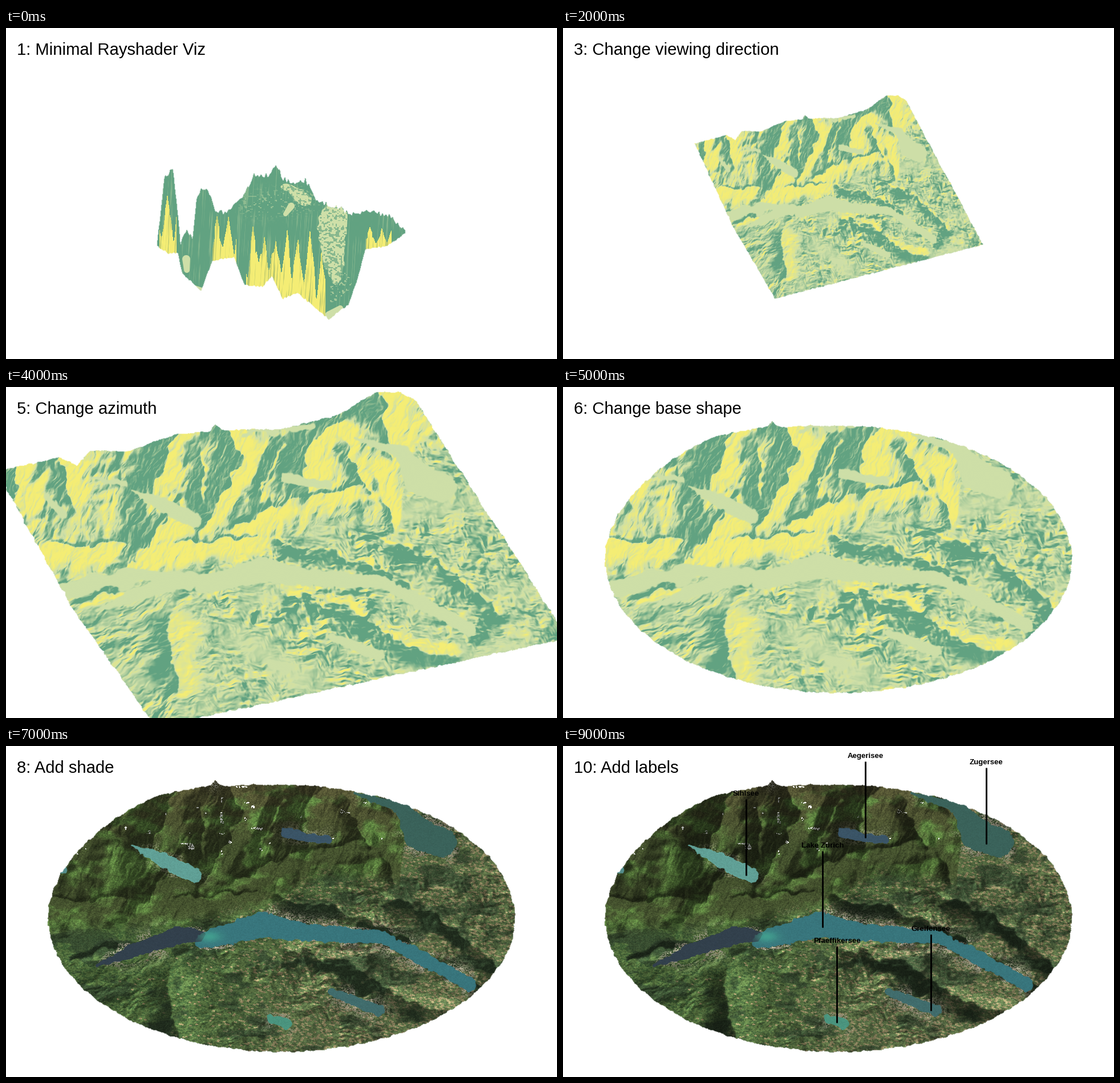
A matplotlib script for the animation above (10 s loop, 966x580 px).

```python
import numpy as np
import matplotlib.pyplot as plt
from matplotlib.animation import FuncAnimation
from matplotlib.path import Path
from matplotlib.transforms import Affine2D

W, H = 966, 580
X0, X1, Y0, Y1 = -40, 1010, -20, 610
X, Y = np.meshgrid(np.arange(X0, X1) + .5, np.arange(Y0, Y1) + .5)


def rgb(*c):
    return np.array(c) / 255


LIGHT, DARK, SUN = rgb(206, 223, 168), rgb(97, 162, 129), rgb(244, 237, 116)


# ---------- helpers ----------
def noise(u, v, seed):
    t = np.random.default_rng(seed).random((256, 256))
    iu, iv = np.floor(u).astype(int), np.floor(v).astype(int)
    fu, fv = u - iu, v - iv
    fu, fv = fu * fu * (3 - 2 * fu), fv * fv * (3 - 2 * fv)
    a, b, c, d = iu % 256, (iu + 1) % 256, iv % 256, (iv + 1) % 256
    top = t[a, c] * (1 - fu) + t[b, c] * fu
    low = t[a, d] * (1 - fu) + t[b, d] * fu
    return top * (1 - fv) + low * fv


def fbm(u, v, seed, octaves=4, ridged=False):
    total = 0
    for k in range(octaves):
        n = noise(u * 2 ** k, v * 2 ** k, seed + k)
        total = total + (1 - abs(2 * n - 1) if ridged else n) / 1.9 ** k
    return total


def cells(u, v, seed):
    t = np.random.default_rng(seed).random((256, 256))
    return t[np.floor(u).astype(int) % 256, np.floor(v).astype(int) % 256]


def blur(a, s):
    fy = np.fft.fftfreq(a.shape[0])[:, None]
    fx = np.fft.rfftfreq(a.shape[1])[None]
    g = np.exp(-2 * (np.pi * s) ** 2 * (fx ** 2 + fy ** 2))
    return np.fft.irfft2(np.fft.rfft2(a) * g, a.shape)


def mix(a, b, t):
    return a + (np.asarray(b) - a) * np.clip(t, 0, 1)[..., None]


def warp(amp, size, seed):
    dx = fbm(X / size, Y / size, seed, 3) - .9
    dy = fbm(X / size, Y / size, seed + 9, 3) - .9
    return X + amp * dx, Y + amp * dy


def spine(points, x, y):
    """Distance to a line with a radius at each point, and the side it lies on."""
    best, side = np.full(x.shape, 1e9), np.zeros(x.shape)
    for (xa, ya, ra), (xb, yb, rb) in zip(points, points[1:]):
        dx, dy = xb - xa, yb - ya
        t = np.clip(((x - xa) * dx + (y - ya) * dy) / (dx * dx + dy * dy), 0, 1)
        d = np.hypot(x - xa - t * dx, y - ya - t * dy) - ra - t * (rb - ra)
        near = d < best
        best = np.where(near, d, best)
        side = np.where(near, np.sign(dx * (y - ya) - dy * (x - xa)), side)
    return best, side


def blob(points, x, y):
    return np.clip(.5 - spine(points, x, y)[0], 0, 1)


def blobs(lines, x, y):
    return np.max([blob(p, x, y) for p in lines], axis=0)


# ---------- the land ----------
# water as (x, y, half width) along its length
MAIN = [(345, 341, 14), (450, 314, 22), (530, 327, 15), (660, 336, 11), (813, 417, 12)]
LAKES = [
    (MAIN, rgb(56, 117, 124)),
    ([(160, 384, 3), (215, 362, 11), (300, 332, 15), (338, 331, 10)], rgb(50, 64, 76)),
    ([(222, 176, 2), (290, 207, 14), (331, 227, 11)], rgb(96, 160, 150)),
    ([(489, 150, 8), (530, 161, 9), (566, 164, 5)], rgb(58, 84, 102)),
    ([(610, 82, 2), (695, 108, 12), (724, 155, 28), (764, 170, 25)], rgb(58, 98, 90)),
    ([(571, 431, 7), (655, 465, 10)], rgb(64, 108, 108)),
    ([(464, 478, 7), (490, 487, 9)], rgb(74, 148, 126)),
    ([(72, 186, 5), (100, 217, 8)], rgb(84, 142, 140)),
]
FLATS = [[(95, 350, 16), (250, 325, 13), (350, 335, 14)],
         [(150, 157, 2), (205, 163, 6)],
         [(420, 74, 4), (535, 62, 5)]]
PLAINS = [[(700, 215, 15), (770, 205, 12)],
          [(420, 440, 22), (510, 505, 22)],
          [(570, 445, 8), (680, 490, 16), (930, 450, 8)]]
# ridges: shaded width, sunlit width, then the crest; the shaded side is right of the way along it
RIDGES = [
    (38, 45, (92, 115), (110, 175)),
    (25, 50, (12, 130), (18, 180)),
    (70, 45, (298, 78), (258, 178)),
    (34, 10, (338, 110), (340, 188)),
    (55, 42, (398, 80), (414, 112), (365, 205)),
    (32, 6, (478, 102), (448, 185)),
    (62, 60, (560, 72), (520, 112), (522, 150)),
    (32, 70, (600, 105), (625, 155)),
    (14, 32, (650, 150), (674, 234)),
    (14, 30, (600, 172), (480, 196), (412, 232)),
    (70, 55, (285, 222), (235, 285)),
    (80, 65, (662, 5), (668, 75)),
    (26, 4, (480, 262), (640, 300), (830, 418)),
    (34, 8, (660, 262), (760, 300), (860, 385)),
    (34, 26, (505, 358), (590, 375), (680, 440), (775, 465)),
    (52, 60, (290, 428), (296, 495)),
    (15, 13, (212, 344), (125, 374)),
    (8, 48, (430, 258), (300, 265), (85, 272)),
]


def relief(angle, length, width, seed, ridged=False, soft=.6):
    """Sunlit slope of a rough surface whose folds run along the angle."""
    x, y = warp(width * .9, width * 2, seed + 40)
    c, s = np.cos(np.radians(angle)), np.sin(np.radians(angle))
    h = fbm((x * c + y * s) / length + 90, (y * c - x * s) / width + 90, seed, 4, ridged)
    gy, gx = np.gradient(blur(h, soft))
    out = -(gx * .8 + gy * .6)
    return out / out.std()


def ridge_light():
    x, y = warp(16, 24, 3)
    total = 0
    for shade, lit, *crest in RIDGES:
        d, side = spine([(*p, 0) for p in crest], x, y)
        w = np.where(side > 0, shade, lit)
        total = total - side * np.clip(2.2 * (1 - d / w), 0, 1)
    return np.clip(total, -1, 1)


def terrain():
    wx, wy = warp(14, 26, 5)
    sx, sy = warp(5, 10, 7)
    foot = np.interp(X, [70, 300, 440, 560, 690, 705, 770], [324, 312, 285, 222, 240, 100, 60])
    alps = 1 / (1 + np.exp(np.clip((Y - foot) / 6, -50, 50)))
    water = blobs([p for p, _ in LAKES], sx, sy)
    flat = blur(np.maximum(water, blobs(FLATS, wx, wy)), .8)
    plain = blur(blobs(PLAINS, wx, wy), 9)
    big = blur(ridge_light(), 1.2)

    west = 1 / (1 + np.exp((X - 340) / 22)) / (1 + np.exp((340 - Y) / 12))
    hills = relief(27, 46, 17, 11) * (1 - west) + relief(-24, 46, 21, 21) * west
    patch = .35 + .65 * np.clip(noise(X / 90, Y / 50, 29) * 1.6 - .2, 0, 1)
    hills = (hills - .55) * patch * .55 * (1 - .75 * plain) + big * .75
    faces = relief(108, 70, 46, 31, True, 3)
    ribs = relief(112, 40, 15, 36, True)
    peaks = np.tanh(1.5 * big + .85 * faces * (1 - .6 * abs(big))) + .3 * ribs
    slope = (peaks * alps + hills * (1 - alps)) * (1 - flat)
    return np.clip(slope, -1, 1), alps, big, water, sx, sy


def hillshade(s):
    base = np.broadcast_to(LIGHT, s.shape + (3,))
    return mix(mix(base, DARK, -s * 1.1), SUN, s * 1.05)


def satellite(s, alps, big, water, sx, sy):
    low = fbm(X / 50, Y / 24, 61, 4) / 2
    fine = noise(X / 1.5, Y / 1.2, 62)
    plot = cells((X + .6 * Y) / 5, (Y - .3 * X) / 2.7, 63)
    dry = np.clip((X + 1.1 * Y - 560) / 500, 0, 1) * np.clip((X - 250) / 250, .15, 1)
    blank = np.zeros(X.shape + (3,))

    fields = mix(blank + rgb(84, 112, 62), rgb(58, 88, 50), (plot < .35) * .8)
    fields = mix(fields, rgb(166, 144, 106), (plot > 1 - .3 * dry) * .8)
    fields = mix(fields, rgb(112, 114, 84), dry * .35)
    woods = np.clip((low - .52) * 12, 0, 1) + np.clip(-big - .1, 0, 1) * np.clip(low * 5 - 1.6, 0, 1)
    fields = mix(fields, rgb(48, 66, 44), woods * .75)

    rough = np.clip((fbm(X / 40, Y / 24, 71, 4) / 2 - .36) * 5 + abs(big) * .4, 0, 1)
    mount = mix(blank + rgb(76, 106, 52), rgb(52, 62, 35), rough)
    mount = mix(mount, rgb(84, 74, 48), np.clip((175 - Y) / 120, 0, 1) * rough * .6)
    land = fields * (1 - alps[..., None]) + mount * alps[..., None]

    # towns gather on the shores, snow on the highest crests
    shore = np.clip(blur(water, 13) * 2.2, 0, .8) * (noise(X / 30, Y / 14, 75) > .52) * (1 - .6 * alps)
    land = mix(land, rgb(150, 140, 126), shore * (fine > .45))
    snow = np.exp(-(abs(X - 366) / 6 + abs(Y - 68) / 7))
    snow = snow + alps * (Y < 190) * (noise(X / 14, Y / 9, 77) > .93)
    land = mix(land, rgb(205, 208, 202), snow * (fine > .45))
    land = land * (.8 + .4 * fine)[..., None]

    for line, color in LAKES:
        land = mix(land, color * (.95 + .1 * fine)[..., None], blob(line, sx, sy))
    glint = np.exp(-((X - 357) / 20) ** 2 - ((Y - 334) / 10) ** 2) * blob(MAIN, sx, sy)
    return mix(land, rgb(70, 175, 150), glint * .7)


# ---------- base shapes ----------
def square_base():
    skyline = [(-17, 140), (70, 122), (95, 116), (125, 130), (147, 104), (215, 106), (300, 75),
               (356, 72), (367, 58), (378, 68), (480, 67), (580, 43), (650, 2), (690, 2), (716, 14)]
    x, y = warp(3, 8, 91)
    path = Path(skyline + [(985, 433), (263, 589), (115, 378)])
    return path.contains_points(np.c_[x.ravel(), y.ravel()]).reshape(X.shape)


def disc_base():
    x, y = warp(3, 8, 91)
    lift = 15 * np.exp(-((X - 265) / 110) ** 2) + 13 * np.exp(-abs(X - 367) / 6)
    y = y + lift * (Y < 300)
    return ((x - 483) / 409) ** 2 + ((y - 302) / 234) ** 2 < 1


def cut(color, base):
    return np.clip(np.dstack([color, blur(base * 1., .5)]), 0, 1)


# ---------- the steep first view ----------
CREST = [(265, 378), (277, 265), (292, 243), (299, 300), (306, 377), (317, 352), (327, 372),
         (334, 300), (342, 281), (358, 290), (367, 318), (385, 325), (418, 292), (434, 257),
         (460, 258), (473, 238), (485, 262), (505, 276), (525, 266), (545, 302), (590, 318),
         (612, 328), (632, 320), (674, 330), (700, 357)]
FOOT = [(265, 382), (285, 395), (301, 393), (309, 430), (342, 461), (362, 407), (400, 402),
        (418, 450), (450, 453), (466, 434), (485, 474), (512, 465), (566, 510), (600, 485),
        (615, 445), (630, 388), (668, 382), (700, 360)]
# sunlit stretches: from, to, first tip, height of the tips
FLAMES = [(269, 299, 283, 288), (362, 404, 370, 325), (421, 560, 433, 342), (631, 676, 638, 347)]


def spikes():
    x, y = np.meshgrid(np.arange(W) + .5, np.arange(H) + .5)
    jag = noise(x / 3, x * 0, 81) - .5
    top = np.interp(x, *zip(*CREST)) + 9 * jag
    foot = np.interp(x, *zip(*FOOT)) + 3 * jag
    streak = noise((x + .06 * y) / 1.7, y / 48, 83)
    grain = noise(x / 3, y / 2.5, 84)
    gx, gy = x + 8 * (noise(x / 9, y / 9, 86) - .5), y + 8 * (noise(x / 9, y / 9, 87) - .5)

    c = mix(np.zeros(x.shape + (3,)) + DARK, LIGHT, (streak - .68) * 1.2)
    c = mix(c, LIGHT, blur(blob([(430, 310, 20), (530, 300, 20)], x, y), 9) * (grain > .72) * .5)
    dappled = [[(572, 330, 24), (573, 380, 24), (578, 440, 10)], [(492, 278, 7), (525, 300, 12)]]
    c = mix(c, LIGHT, blobs(dappled, gx, gy) * (.35 + .65 * (grain > .4)))
    c = mix(c, LIGHT, blob([(575, 470, 10), (590, 445, 16)], gx, gy) * (grain > .7) * .6)
    pools = [[(316, 405, 7), (317, 424, 5)], [(328, 453, 3), (343, 459, 4)],
             [(567, 504, 8), (586, 491, 5)], [(490, 326, 4), (500, 312, 6)]]
    c = mix(c, LIGHT, blobs(pools, x, y))

    sunlit = mix(np.zeros(c.shape) + SUN, rgb(158, 182, 108), (streak - .58) * 2.4)
    for a, b, tip, peak in FLAMES:
        saw = abs(2 * (((x - tip) / 20 + .5) % 1) - 1)
        rise = 1 - .62 * saw ** .8 - .35 * noise(x / 5, x * 0, 88) * (abs(x - tip) > 4)
        base = np.maximum(foot, peak)
        c = mix(c, sunlit, (x > a) & (x < b) & (y > base - (base - peak) * rise))
    inside = (y > top) & (y < foot) & (x > 265) & (x < 700)
    return np.clip(np.dstack([c, blur(inside * 1., .5)]), 0, 1)


# ---------- pictures and views ----------
land = terrain()
slope, alps, big, water = land[:4]
photo = satellite(*land)
lit = photo * (1 + .36 * slope)[..., None]
shadow = np.clip(-blur(big, 3) + .4 * alps, 0, 1) * (1 - water)
dusk = lit * (1 - .24 * shadow)[..., None]

shaded = hillshade(slope)
disc = disc_base()
square = cut(shaded, square_base())
final = cut(dusk, disc)

same = Affine2D()
near = Affine2D().scale(1, 1.2).translate(0, -53.6)
far = Affine2D().scale(.504, .6048).translate(239.5, 118)
# south-east corner turned to the front
m = np.array([[-276, 276], [-193, -193]]) @ np.linalg.inv([[717, 280], [-137, 449]])
t = np.array([483, 480]) - m @ np.array([-17, 140])
turned = Affine2D(np.array([[*m[0], t[0]], [*m[1], t[1]], [0, 0, 1]]))

SCENES = [
    ("Minimal Rayshader Viz", None, same),
    ("Change z-scale", square, turned),
    ("Change viewing direction", square, far),
    ("Change zoom", square, near),
    ("Change azimuth", square, Affine2D().translate(0, 7)),
    ("Change base shape", cut(shaded, disc), same),
    ("Add overlay", cut(photo * 1.06, disc), same),
    ("Add shade", cut(lit, disc), same),
    ("Add shadow", final, same),
    ("Add labels", final, same),
]
LABELS = [("Aegerisee", 530, 21), ("Zugersee", 742, 32), ("Sihlsee", 321, 87),
          ("Lake Zurich", 455, 178), ("Greifensee", 645, 324), ("Pfaeffikersee", 480, 345)]

# ---------- figure ----------
fig = plt.figure(figsize=(W / 100, H / 100), dpi=100, facecolor="white")
ax = fig.add_axes([0, 0, 1, 1])
first = ax.imshow(spikes(), extent=(0, W, H, 0), aspect="auto")
view = ax.imshow(square, extent=(X0, X1, Y1, Y0), aspect="auto")
ax.set_xlim(0, W)
ax.set_ylim(H, 0)
ax.axis("off")
title = ax.text(18.6, 47, "", family="Liberation Sans", size=21.1, va="baseline")
labels = []
for name, x, base in LABELS:
    labels += ax.plot([x, x], [base + 6, base + 140], color="black", lw=2.1,
                      solid_capstyle="butt")
    labels.append(ax.text(x, base, name, family="Liberation Sans", weight="bold",
                          size=9.5, ha="center", va="baseline"))


def update(i):
    text, picture, place = SCENES[i]
    title.set_text(f"{i + 1}: {text}")
    first.set_visible(picture is None)
    view.set_visible(picture is not None)
    if picture is not None:
        view.set_data(picture)
        view.set_transform(place + ax.transData)
    for part in labels:
        part.set_visible(i == len(SCENES) - 1)
    return [first, view, title, *labels]


anim = FuncAnimation(fig, update, frames=len(SCENES), interval=1000, repeat=True,
                     repeat_delay=0, blit=False)
plt.show()
```
